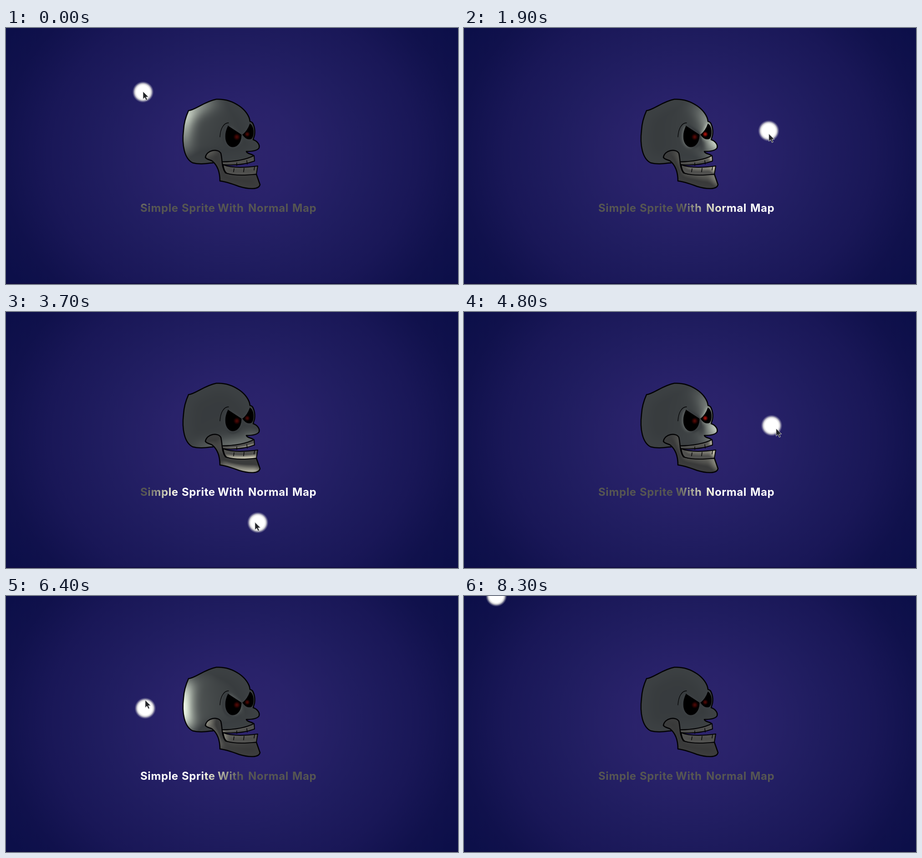
Recreate the animation shown at these times as an HTML page with a canvas. Size 993x564 px, loop 8800 ms.

```html
<!DOCTYPE html>
<html lang="en">
<head>
<meta charset="utf-8">
<title>Simple Sprite With Normal Map</title>
<style>
  html, body { margin: 0; width: 100%; height: 100%; overflow: hidden; }
  body {
    position: relative;
    background:
      linear-gradient(#110b40, #110b40) 0 100% / 100% 2px no-repeat,
      radial-gradient(580px 490px at 497px 276px,
        #2f256e 0, #29226a 24%, #201d60 48%, #191757 70%, #10114c 88%, #0c0f49 100%);
  }
  canvas, svg { position: absolute; left: 0; top: 0; }
  text { font: 700 24px Inter, "Open Sans", sans-serif; letter-spacing: .6px; }
</style>
</head>
<body>
<canvas id="skull" width="993" height="564"></canvas>
<svg width="993" height="564" viewBox="0 0 993 564">
  <defs>
    <radialGradient id="lit" gradientUnits="userSpaceOnUse" r="255">
      <stop offset=".74" stop-color="#fff"/>
      <stop offset=".78" stop-color="#f2f2da"/>
      <stop offset="1" stop-color="#565652"/>
    </radialGradient>
    <radialGradient id="glow">
      <stop offset=".62" stop-color="#fff"/>
      <stop offset=".76" stop-color="#fffff4" stop-opacity=".82"/>
      <stop offset=".89" stop-color="#fffff0" stop-opacity=".3"/>
      <stop offset="1" stop-color="#fffff0" stop-opacity="0"/>
    </radialGradient>
  </defs>
  <text y="404.5" fill="url(#lit)"><tspan x="295">Simple</tspan> <tspan x="386">Sprite</tspan> <tspan x="465">With</tspan> <tspan x="532">Normal</tspan> <tspan x="629">Map</tspan></text>
  <circle id="orb" r="23.5" fill="url(#glow)"/>
  <path id="cursor" d="M0 0V16.5L3.9 13L6.8 19.2L9.5 18L6.8 12H12Z" fill="#222428" stroke="#dcdcdc" stroke-width=".9"/>
</svg>
<script>
const LOOP = 8800, STEP = 100;
const $ = id => document.getElementById(id);

// Each sweep of the light: a spline through evenly timed points, then a rest
const sweeps = [
  { from: 500, to: 1600, via: [[301, 141], [395, 91], [560, 107], [655, 185], [668, 212]] },
  { from: 1800, to: 3100, via: [[668, 212], [655, 310], [536, 444], [458, 472], [436, 473]] },
  { from: 3200, to: 5000, via: [[436, 473], [480, 468], [592, 460], [690, 436], [780, 350], [700, 270], [645, 228]] },
  { from: 5300, to: 6900, via: [[645, 228], [495, 158], [350, 118], [308, 215], [318, 285], [381, 357]] },
  { from: 7000, to: 8300, via: [[381, 357], [294, 289], [175, 105], [101, 18], [71, 0]] }
];

function lightAt(t) {
  const { from, to, via } = sweeps.findLast(s => t >= s.from) || sweeps[0];
  const last = via.length - 1;
  const f = Math.min(1, Math.max(0, (t - from) / (to - from))) * last;
  const i = Math.min(last - 1, Math.floor(f)), u = f - i, v = 1 - u;
  const slope = (k, c) => k % last ? (via[k + 1][c] - via[k - 1][c]) / 2 : 0;
  return [0, 1].map(c =>
    via[i][c] * v * v * (1 + 2 * u) + via[i + 1][c] * u * u * (3 - 2 * u) +
    slope(i, c) * u * v * v - slope(i + 1, c) * u * u * v);
}

// The pointer first leads the light, then slowly falls behind it
const pointerAt = t => lightAt(t + 70 - t * .023);

// Sprite geometry, in stage coordinates
const X0 = 365, Y0 = 135, W = 212, H = 240;
const cranium = new Path2D(`M401 182C415 181 436 162 462 157C500 155 534 182 536 206
  C544 206 548 223 546 236L543 246C552 249 558 257 556 264C552 271 540 272 528 272
  C530 278 540 277 544 281L545 285Q520 295 474 295L455 297C438 299 424 301 410 297
  C392 288 386 258 390 225C391 208 396 193 401 182Z`);
const nose = new Path2D('M522 244C540 243 557 253 556 264C550 272 540 272 524 270Z');
const eyeL = new Path2D('M488 216L517 235C517 250 510 262 498 262C484 262 476 239 488 216Z');
const eyeR = new Path2D('M520 235Q531 226 536 211C545 216 546 238 539 244C531 247 524 242 520 235Z');
const upper = new Path2D('M474 295Q520 294 545 281L546 293Q518 304 476 301Z');
const jaw = new Path2D(`M438 285C441 268 466 265 472 276C476 292 473 306 482 319
  Q500 325 550 322L558 345C556 356 535 356 512 349C496 343 482 338 470 337
  C470 318 464 302 453 293C448 290 441 290 438 285Z`);
const lower = new Path2D('M477 301Q500 311 553 304L550 322Q506 327 485 320Q479 316 477 301Z');
const cracks = new Path2D('M507 297V303M529 292L530 300M501 310L500 317M523 309L522 317M546 306L545 313');
const brow = new Path2D('M470 240C471 222 478 209 489 209');

// Solid parts replace the normals under them; dents and bumps add to them
const parts = [
  { shape: cranium, blur: 14, rise: 15 },
  { shape: nose, blur: 5, rise: 2, add: true },
  { shape: eyeL, blur: 3, rise: -3, add: true },
  { shape: eyeR, blur: 3, rise: -2, add: true },
  { shape: upper, blur: 4, rise: 5 },
  { shape: jaw, blur: 7, rise: 7 },
  { shape: lower, blur: 5, rise: 6 }
];

function layer(draw) {
  const c = document.createElement('canvas');
  c.width = W;
  c.height = H;
  const g = c.getContext('2d', { willReadFrequently: true });
  g.translate(-X0, -Y0);
  draw(g);
  return g.getImageData(0, 0, W, H).data;
}

function boxBlur(src, radius, step, lineStep, len, lines) {
  const out = new Float32Array(src.length);
  for (let l = 0; l < lines; l++) {
    let sum = 0;
    const at = i => i < 0 || i >= len ? 0 : src[l * lineStep + i * step];
    for (let i = -radius; i < radius; i++) sum += at(i);
    for (let i = 0; i < len; i++) {
      sum += at(i + radius);
      out[l * lineStep + i * step] = sum / (2 * radius + 1);
      sum -= at(i - radius);
    }
  }
  return out;
}

function smooth(field, radius) {
  for (let n = 0; n < 3; n++) {
    field = boxBlur(field, radius, 1, W, W, H);
    field = boxBlur(field, radius, W, 1, H, W);
  }
  return field;
}

const nx = new Float32Array(W * H), ny = new Float32Array(W * H);
for (const { shape, blur, rise, add } of parts) {
  const pixels = layer(g => g.fill(shape));
  const mask = Float32Array.from({ length: W * H }, (_, i) => pixels[i * 4 + 3] / 255);
  const h = smooth(mask, blur);
  for (let i = W; i < W * (H - 1); i++) {
    if (!add && mask[i] < .4) continue;
    const gx = (h[i - 1] - h[i + 1]) * rise / 2, gy = (h[i - W] - h[i + W]) * rise / 2;
    nx[i] = add ? nx[i] + gx : gx;
    ny[i] = add ? ny[i] + gy : gy;
  }
}

const albedo = layer(g => {
  const paint = (shape, fill, line = 2.5) => {
    g.fillStyle = fill;
    g.fill(shape);
    g.lineWidth = line;
    g.stroke(shape);
  };
  const pupil = (x, y, r) => {
    const glow = g.createRadialGradient(x, y, 0, x, y, r);
    glow.addColorStop(0, 'rgb(250,35,20)');
    glow.addColorStop(.4, 'rgba(205,20,12,.8)');
    glow.addColorStop(1, 'rgba(150,0,0,0)');
    g.fillStyle = glow;
    g.fillRect(x - r, y - r, 2 * r, 2 * r);
  };
  g.strokeStyle = '#06060a';
  g.lineJoin = g.lineCap = 'round';
  paint(cranium, 'rgb(168,180,187)');
  paint(eyeL, '#000', 1);
  paint(eyeR, '#000', 1);
  pupil(507, 240, 8);
  pupil(530, 234, 6.5);
  g.lineWidth = 1.3;
  g.stroke(brow);
  paint(upper, 'rgb(232,232,226)', 2);
  paint(jaw, 'rgb(170,172,172)');
  paint(lower, 'rgb(232,232,226)', 2);
  g.lineWidth = 1.5;
  g.stroke(cracks);
});

const AMBIENT = .33, REACH = 255, ENERGY = 4.2, HEIGHT = 10;
const ctx = $('skull').getContext('2d');
const frame = ctx.createImageData(W, H);

function shade(lx, ly) {
  const out = frame.data;
  for (let i = 0; i < W * H; i++) {
    const k = i * 4;
    if (!albedo[k + 3]) continue;
    const dx = lx - X0 - i % W, dy = ly - Y0 - Math.floor(i / W);
    const d = Math.hypot(dx, dy), tilt = Math.hypot(nx[i], ny[i]);
    const facing = (nx[i] * dx + ny[i] * dy + HEIGHT) / (Math.hypot(tilt, 1) * Math.hypot(d, HEIGHT));
    const power = Math.min(2.4, ENERGY * Math.max(0, 1 - d / REACH) ** 1.5);
    const light = power * Math.max(0, facing);
    const base = AMBIENT * (1 + .2 * Math.min(1, tilt));
    out[k] = albedo[k] * (base + light);
    out[k + 1] = albedo[k + 1] * (base + light * .97);
    out[k + 2] = albedo[k + 2] * (base + light * .83);
    out[k + 3] = albedo[k + 3];
  }
  ctx.putImageData(frame, X0, Y0);
}

let shown = -1;
function tick() {
  const t = Math.floor(performance.now() % LOOP / STEP) * STEP;
  if (t !== shown) {
    shown = t;
    const [x, y] = lightAt(t), [px, py] = pointerAt(t);
    shade(x, y);
    $('lit').setAttribute('cx', x);
    $('lit').setAttribute('cy', y);
    $('orb').setAttribute('transform', `translate(${x} ${y})`);
    $('cursor').setAttribute('transform', `translate(${px} ${py - 1})`);
    $('cursor').style.display = t < 7800 ? '' : 'none';
  }
  requestAnimationFrame(tick);
}
tick();
</script>
</body>
</html>
```
